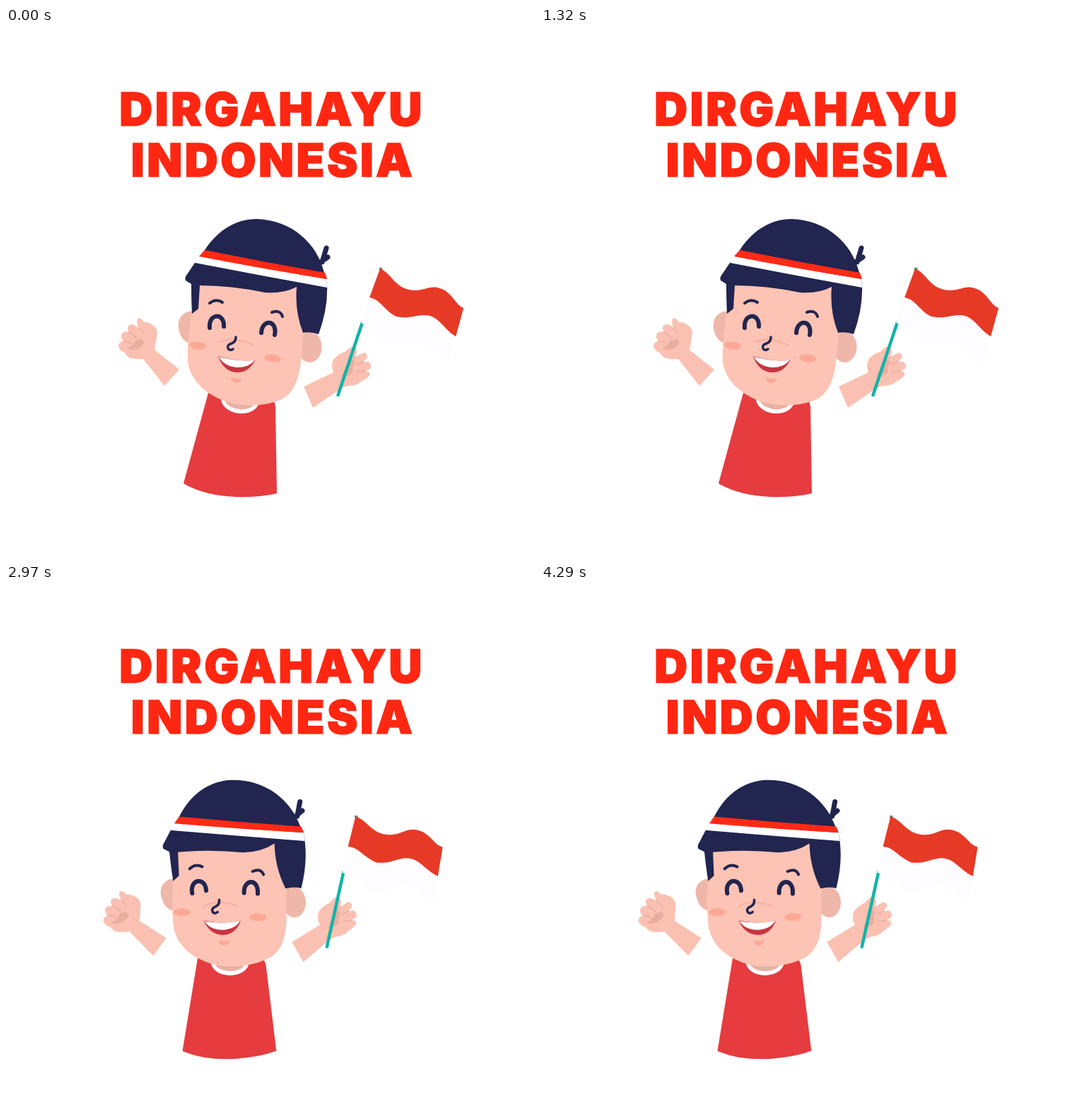
Recreate the animation shown at these times as an HTML page. Size 748 px wide and 748 px high, loop 4.56 s.

```html
<!DOCTYPE html>
<html lang="id">
<head>
<meta charset="utf-8">
<title>Dirgahayu Indonesia</title>
<style>
  html, body { margin: 0; width: 100%; height: 100%; overflow: hidden; background: #fff; }
  svg { display: block; width: 100vw; height: 100vh; }
  text {
    font: 900 65px Inter, sans-serif; letter-spacing: 3.5px; text-anchor: middle;
    fill: #ff2712; stroke: #ff2712; stroke-width: 1.5px;
  }
  .hair { fill: #21254f; }
  .line { fill: none; stroke: #21254f; stroke-linecap: round; stroke-linejoin: round; }
  .arm { fill: #fac1b2; }
  .ear { fill: #efb7a9; }
  .shade { fill: #eaaea0; }
  .crease { fill: none; stroke: #eaaea0; stroke-width: 1.5; stroke-linecap: round; }
  .blush { fill: #fba995; }
</style>
</head>
<body>
<svg viewBox="0 0 748 748">
  <text x="376" y="138">DIRGAHAYU</text>
  <text x="377.5" y="209.5">INDONESIA</text>

  <g id="boy">
    <!-- left arm -->
    <path class="arm" d="M186 411Q191 409 195 416Q203 415 212 424Q215 430 213 438L210 455L245 483L224 506L194 468Q185 469 177 467Q171 465 168 459Q161 457 159 450Q159 444 166 443Q161 438 164 432Q167 428 174 430Q170 424 174 420Q180 417 187 424Q184 415 186 411Z"/>
    <path class="shade" d="M183 442Q192 437 196 444Q193 451 185 454Q177 457 171 453Q179 450 183 442Z"/>
    <path class="crease" d="M166 443Q173 443 177 446M174 430Q181 434 184 439M187 424Q192 428 194 432"/>

    <!-- right arm and flag -->
    <path class="arm" d="M421 507L463 487Q459 477 463 469Q469 461 479 458L488 451Q496 450 496 458L494 465L506 459Q513 462 510 467L505 472L513 472Q518 477 515 482L508 485Q516 486 514 491Q510 497 503 499Q497 506 484 506Q477 507 469 513L434 537Z"/>
    <path class="shade" d="M484 470Q490 468 494 472Q489 478 490 488Q482 494 474 492Q480 484 484 470Z"/>
    <path class="crease" d="M494 465L488 470M505 472L495 476M508 485L496 486"/>
    <path d="M504 416L469.500 519" stroke="#12b3a8" stroke-width="4.500" stroke-linecap="round"/>
    <circle cx="530" cy="341" r="2.500" fill="#4f9c8b"/>
    <path fill="#fdfcfe" d="M514 381C530 384 534 399 552 408C570 411 570 408 590 406C612 405 617 425 636 436L625 474C608 463 604 445 580 445C562 446 558 450 541 446C523 437 519 423 502 417Z"/>
    <path fill="#e63a27" d="M529 340C547 348 550 371 580 371C597 370 603 361 622 372C634 381 636 391 647 396L636 436C617 425 612 405 590 406C570 408 570 411 552 408C534 399 530 384 514 381Z"/>

    <!-- body -->
    <path fill="#e63c3f" d="M286 516L251 644Q280 661 325 663Q360 664 383 658L381 535Q380 527 374 525Z"/>
    <ellipse cx="331" cy="526" rx="27" ry="19" fill="#fff" transform="rotate(6 331 526)"/>
    <ellipse cx="331" cy="526" rx="22" ry="13" fill="#e8b1a5" transform="rotate(6 331 526)"/>

    <!-- head -->
    <path class="ear" d="M266 400C249 400 242 412 244 424C246 437 252 444 259 445Z"/>
    <ellipse class="ear" cx="429.500" cy="451" rx="17" ry="22"/>
    <path fill="#fdc3b4" d="M272 350L270 394L262 404C259 430 256 450 257 472C261 497 278 514 305 526C328 535 362 537 390 525C410 514 416 490 418 462L421 429L414 350Z"/>
    <path class="hair" d="M254 357Q252 353 257 347L267 332L281 314C300 285 326 270 355 270C405 272 440 305 450 346Q455 356 454 372Q454 400 442 433Q432 429 420 431Q408 400 411 366Q392 376 366 374Q318 364 274 364L272 397L263 404Q262 385 262 362Z"/>
    <path class="line" stroke-width="7" d="M447 331L453 311M446 330L455 324"/>
    <path fill="#fff" d="M273 322Q360 339 453.500 355L454 367Q360 350 267 332Z"/>
    <path fill="#ff2a16" d="M281 314Q365 331 451 346L454 355Q360 340 273 323Z"/>

    <!-- face -->
    <path class="line" stroke-width="6" d="M288 424C286 403 309 402 308 422M361 431C362 411 384 412 380 434"/>
    <path class="line" stroke-width="4" d="M288 389Q297 382 306 388M376 402Q388 398 391 408"/>
    <path fill="none" stroke="#f9ad9c" stroke-width="2" stroke-linecap="round" d="M302 444Q313 439 325 441Q341 443 350 449"/>
    <path class="line" stroke-width="3.500" d="M325 437Q325 444 319 446Q312 448 314 453Q316 457 321 454"/>
    <ellipse class="blush" cx="271" cy="449" rx="12" ry="5.500" transform="rotate(6 271 449)"/>
    <ellipse class="blush" cx="377" cy="467" rx="12" ry="5.500" transform="rotate(6 377 467)"/>
    <path fill="#c9353f" d="M300 464Q326 472 352 470Q343 488 325 487Q307 485 300 464Z"/>
    <path fill="#fff" d="M301 465Q326 472 351 470Q344 480 326 480Q308 478 301 465Z"/>
    <path class="blush" d="M318 494Q325 496 333 496Q331 502 325 502Q319 501 318 494Z"/>
  </g>
</svg>
<script>
  const LOOP = 4560, BEAT = 330;
  const TILT = "translate(-67.4 44.5) rotate(-6)";
  const boy = document.getElementById("boy");

  // The boy sways between two poses, one per beat.
  function draw(now) {
    const beat = Math.floor(now % LOOP / BEAT);
    boy.setAttribute("transform", beat % 2 ? TILT : "");
    requestAnimationFrame(draw);
  }
  draw(0);
</script>
</body>
</html>
```
